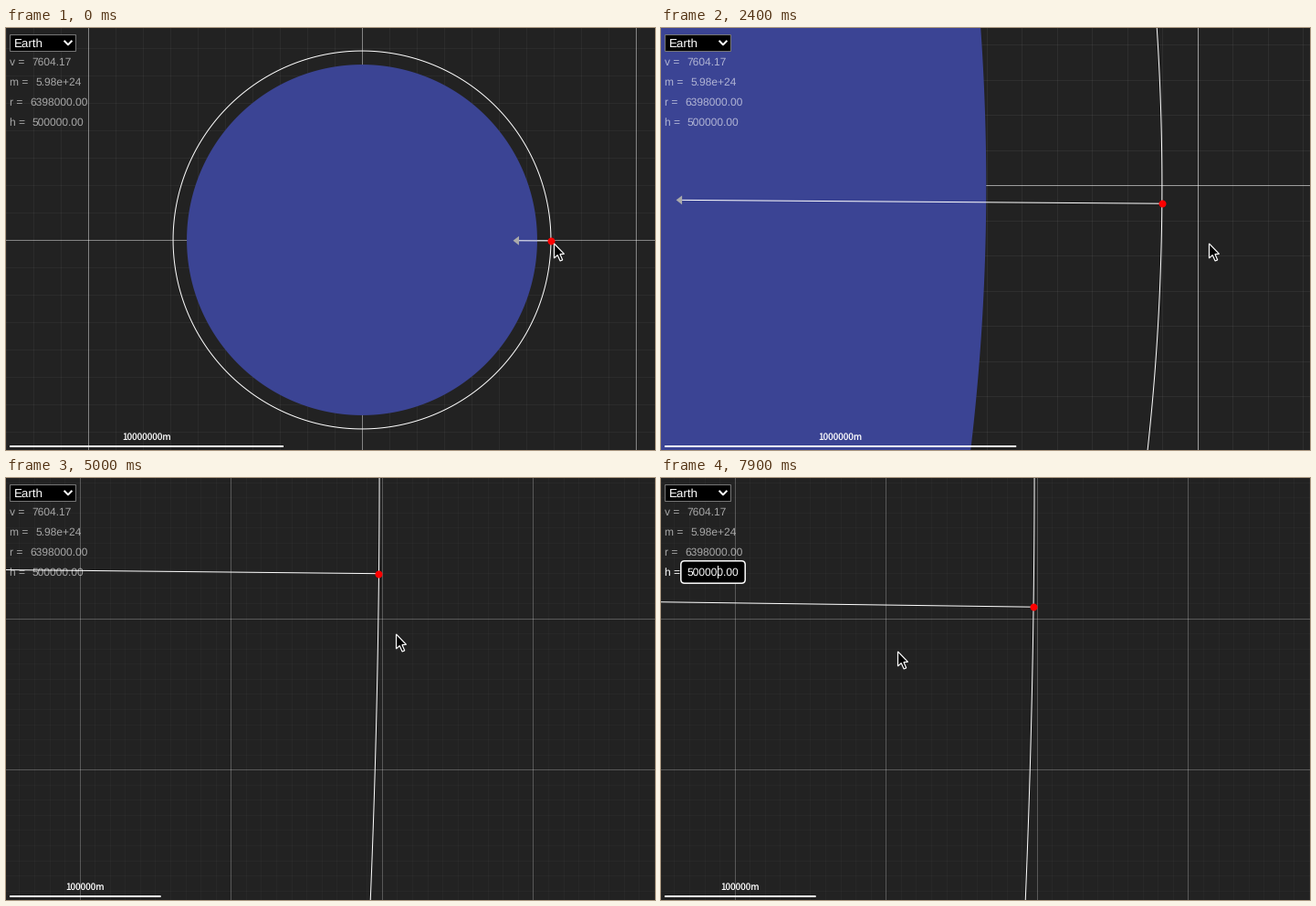
Animation of 711 by 462 pixels, one loop 8000 ms. Source, as a matplotlib script:

```python
import matplotlib.pyplot as plt
import numpy as np
from matplotlib.animation import FuncAnimation
from matplotlib.collections import LineCollection
from matplotlib.patches import FancyBboxPatch, Polygon, Rectangle

W, H = 711, 462
FRAMES, STEP = 80, 100
BG = "#222222"
plt.rcParams.update({"path.simplify": False, "text.hinting": "none", "toolbar": "None"})

# World, in metres
BODY, ORBIT = 6.398e6, 6.898e6
SPEED, START = 7604.17, 32140
ARROW = 1.3818e6
BASE_SCALE, ZOOM = 3e-5, 1.2

# Frame, x, y of the pointer tip
POINTER = np.array([
    (0, 600.5, 236), (33, 600.5, 236), (40, 440, 99.5), (45, 440, 99.5),
    (49, 427.5, 171), (54, 427.5, 171), (57, 66, 104), (60, 66, 104),
    (63, 118, 182), (66, 159.5, 173), (68, 159.5, 173), (72, 259.5, 190),
    (80, 259.5, 190),
])
POINTER_SHAPE = np.array([
    (0, 0), (0, 16), (3.7, 12.6), (6.6, 19), (9.2, 17.9), (6.4, 11.6), (11, 11.4),
])
LAST_ZOOM, CLICK = 43, 57

fig = plt.figure(figsize=(W / 72, H / 72), dpi=72, facecolor=BG)
ax = fig.add_axes([0, 0, 1, 1])
ax.set_xlim(0, W)
ax.set_ylim(H, 0)
ax.axis("off")


def line(z, **kw):
    style = dict(color="white", lw=1, solid_capstyle="butt", snap=False, zorder=z)
    return ax.plot([], [], **{**style, **kw})[0]


def shape(points, z, **kw):
    return ax.add_patch(Polygon(points, closed=True, zorder=z, snap=False, **kw))


def label(x, y, s, size=12, font="Liberation Sans", **kw):
    style = dict(color="white", va="baseline", zorder=10)
    return ax.text(x, y, s, fontsize=size, family=font, **{**style, **kw})


grid = ax.add_collection(LineCollection([], linewidths=1, zorder=1))
grid.set_snap(False)
body = shape([(0, 0)] * 3, 2, fc="#3b4494", ec="none")
ring = line(3)
pull = line(4)
head = shape([(0, 0)] * 3, 5, fc="#aaaaaa", ec="none")
sat = line(6, marker="o", ms=8, mfc="red", mec="none")
bar = line(9, lw=2)
bar_text = label(0, 450.6, "", 10, "Noto Sans CJK JP", ha="center")

# Dropdown
ax.add_patch(Rectangle((4.5, 7.5), 72, 18, fc="black", ec="#767676", lw=1, snap=False, zorder=9))
label(9, 21, "Earth", 13.33)
line(10, lw=2).set_data([63.6, 68, 72.4], [13.8, 18.3, 13.8])

# Readouts
rows = [("v", "7604.17", 28.3), ("m", "5.98e+24", 32.4),
        ("r", "6398000.00", 26.3), ("h", "500000.00", 29)]
for i, (name, value, x) in enumerate(rows):
    h_texts = [label(4, 41 + 22 * i, name + " =", alpha=0.6),
               label(x, 41 + 22 * i, value, alpha=0.6)]
field = ax.add_patch(FancyBboxPatch(
    (21.8, 90.8), 70.4, 24.4, boxstyle="round,pad=0,rounding_size=4",
    fc="black", ec="white", lw=1.5, snap=False, zorder=9))
caret = line(11)
caret.set_data([62.5, 62.5], [96, 110])
cursor = shape(POINTER_SHAPE, 20, fc="black", ec="white", lw=1.2, joinstyle="miter")

# Angles packed densely around the satellite's side of the circle
THETA = np.pi * np.linspace(-1, 1, 801) ** 3
UNIT = np.column_stack([np.cos(THETA), np.sin(THETA)])


def view(f):
    """Scale in px per metre and the body's centre on the stage."""
    n = round(float(np.interp(f, [15, 22, 29, 30], [0, 11, 20, 21])))
    focus = np.array([601, 237])
    k = ZOOM ** n
    centre = focus + (np.array([390, 232]) - focus) * k
    if f >= LAST_ZOOM:
        focus = np.array([440, 99.4])
        centre = focus + (centre - focus) * ZOOM
        k *= ZOOM
    return BASE_SCALE * k, centre


def pointer(f):
    i = min(np.searchsorted(POINTER[:, 0], f, side="right"), len(POINTER) - 1)
    a, b = POINTER[i - 1], POINTER[i]
    u = (f - a[0]) / (b[0] - a[0])
    return a[1:] + (b[1:] - a[1:]) * u * u * (3 - 2 * u)


def marks(origin, gap, size):
    first, last = np.ceil(-origin / gap), np.floor((size - origin) / gap)
    return np.floor(origin + gap * np.arange(first, last + 1) + 1e-6) + 0.5


def draw_grid(centre, unit):
    segs, colors = [], []
    for gap in (unit / 10, unit):
        new = [[(x, 0), (x, H)] for x in marks(centre[0], gap, W)]
        new += [[(0, y), (W, y)] for y in marks(centre[1], gap, H)]
        segs += new
        colors += [(1, 1, 1, gap / W)] * len(new)
    grid.set_segments(segs)
    grid.set_color(colors)


def update(f):
    scale, centre = view(f)
    metres = 10 ** int(np.floor(np.log10(W / scale)))
    unit = metres * scale
    draw_grid(centre, unit)

    body.set_xy(centre + UNIT * BODY * scale)
    ring.set_data(*(centre + UNIT * ORBIT * scale).T)

    angle = (START + SPEED * f * STEP / 1000) / ORBIT
    out = np.array([np.cos(angle), np.sin(angle)])
    side = np.array([-out[1], out[0]])
    pos = centre + out * ORBIT * scale
    tip = pos - out * ARROW * scale
    neck = tip + out * 6.5
    pull.set_data(*np.array([pos, neck]).T)
    head.set_xy([tip, neck + side * 5, neck - side * 5])
    sat.set_data([pos[0]], [pos[1]])

    bar.set_data([4, 4 + unit], [458, 458])
    bar_text.set_text(f"{metres}m")
    bar_text.set_x(4 + unit / 2)

    editing = f >= CLICK
    field.set_visible(editing)
    caret.set_visible(editing and (f - CLICK) % 10 < 5)
    for t in h_texts:
        t.set_alpha(1 if editing else 0.6)
    cursor.set_xy(POINTER_SHAPE + pointer(f))
    return []


anim = FuncAnimation(fig, update, frames=FRAMES, interval=STEP,
                     init_func=lambda: update(0), repeat=True, repeat_delay=0)
plt.show()
```
